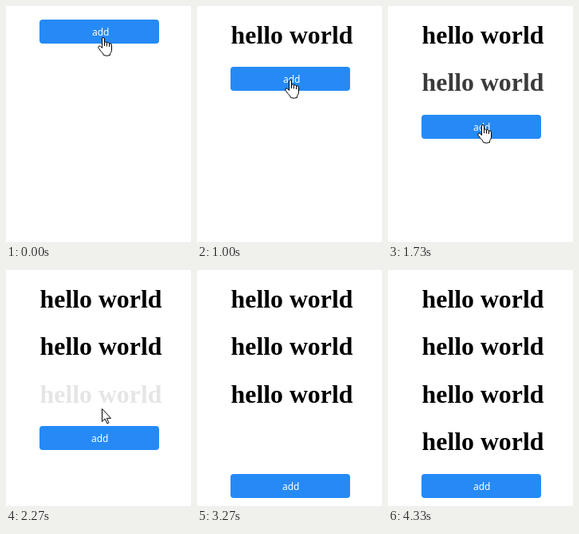
An HTML page for the animation above (4390 ms loop, 232 by 295 pixels).

```html
<!DOCTYPE html>
<html lang="en">
<head>
<meta charset="utf-8">
<title>Fade-in list</title>
<style>
  html, body { margin: 0; width: 100%; height: 100%; overflow: hidden; background: #fff; }
  svg { display: block; width: 232px; height: 295px; }
  .line { font: bold 31.8px "Liberation Serif", serif; }
  .label { font: 500 12px "Noto Sans", sans-serif; fill: #fff; }
  .cursor path { fill: #fff; stroke: #000; stroke-linejoin: round; }
  .cursor .fingers { fill: none; }
</style>
</head>
<body>
<svg viewBox="0 0 232 295">
  <g id="lines"></g>
  <g id="button">
    <rect x="42" width="150" height="30" rx="4" fill="#258af6"/>
    <text id="label" class="label" y="20">add</text>
  </g>
  <g id="arrow" class="cursor">
    <path d="M.5 .5V16.5L4.2 13L6.8 18.8L8.9 17.9L6.4 12.3H11.5Z"/>
  </g>
  <g id="hand" class="cursor">
    <path d="M-.5 13.5V2Q-.5 .5 1 .5T2.5 2V6.5Q4 5 5.5 7Q7.5 5.5 8.5 8Q11.5 7 11.5 10V16Q11.5 18 9.5 20.5V22.5Q5 24 1.5 22.5Q1 20 -2 17.5L-5 13.5Q-5.7 11.5 -4 10.8Q-2.5 10.8 -.5 13.5Z"/>
    <path class="fingers" d="M2.5 6.5V11M5.5 7V11.5M8.5 8V12"/>
  </g>
</svg>
<script>
const LOOP = 4390, STEP = 1000 / 15, FADE = 1000, PITCH = 59.44;
const CURSOR_END = 3250;

// When each line is inserted, and when its fade begins.
const items = [
  { add: 60, fade: 130 },
  { add: 1060, fade: 1070 },
  { add: 2060, fade: 2050 },
  { add: 3195, fade: 3280 }
];

// Pointer path: time, x, y
const path = [
  [0, 121, 39], [200, 120, 42], [700, 116, 78], [1000, 116, 92],
  [1130, 116, 93], [1600, 118, 136], [1733, 118, 148], [2060, 118, 150],
  [2266, 120, 173], [2670, 120, 193], [2740, 120, 196], [2933, 120, 198],
  [3200, 120, 211]
];

const $ = id => document.getElementById(id);
const place = (el, x, y) => el.setAttribute("transform", `translate(${x} ${y})`);
const show = (el, on) => el.style.display = on ? "" : "none";
const rowTop = n => Math.round(17 + n * PITCH);
const countAt = t => items.filter(item => t >= item.add).length;

for (const [i, item] of items.entries()) {
  const text = document.createElementNS("http://www.w3.org/2000/svg", "text");
  text.setAttribute("class", "line");
  text.setAttribute("x", 42.6);
  text.setAttribute("y", Math.round(47 + i * PITCH));
  text.textContent = "hello world";
  $("lines").append(text);
  item.el = text;
}

// cubic-bezier(.42, 0, .58, 1)
function easeInOut(x) {
  if (x <= 0) return 0;
  if (x >= 1) return 1;
  let lo = 0, hi = 1;
  for (let i = 0; i < 20; i++) {
    const s = (lo + hi) / 2, r = 1 - s;
    if (1.26 * s * r * r + 1.74 * s * s * r + s ** 3 < x) lo = s;
    else hi = s;
  }
  return lo * lo * (3 - 2 * lo);
}

function pointerAt(t) {
  const i = path.findIndex(p => p[0] > t);
  if (i < 0) return path[path.length - 1].slice(1);
  const [t0, x0, y0] = path[i - 1], [t1, x1, y1] = path[i];
  const k = (t - t0) / (t1 - t0);
  return [Math.round(x0 + (x1 - x0) * k), Math.round(y0 + (y1 - y0) * k)];
}

function draw(now) {
  const t = Math.floor((now % LOOP + 4) / STEP) * STEP;
  const count = countAt(t);

  for (const { el, add, fade } of items) {
    el.style.opacity = t < add ? 0 : easeInOut((t - fade) / FADE);
  }
  place($("button"), 0, rowTop(count));
  $("label").setAttribute("x", count < 2 ? 108 : 107);

  // The pointer shape reacts one step after the button moves.
  const [x, y] = pointerAt(t);
  const top = rowTop(countAt(t - STEP));
  const over = y >= top && y < top + 30;
  const visible = t < CURSOR_END;
  show($("hand"), visible && over);
  show($("arrow"), visible && !over);
  place($("hand"), x, y);
  place($("arrow"), x, y);
}

const start = performance.now();
function tick() {
  draw(performance.now() - start);
  requestAnimationFrame(tick);
}
tick();
</script>
</body>
</html>
```
